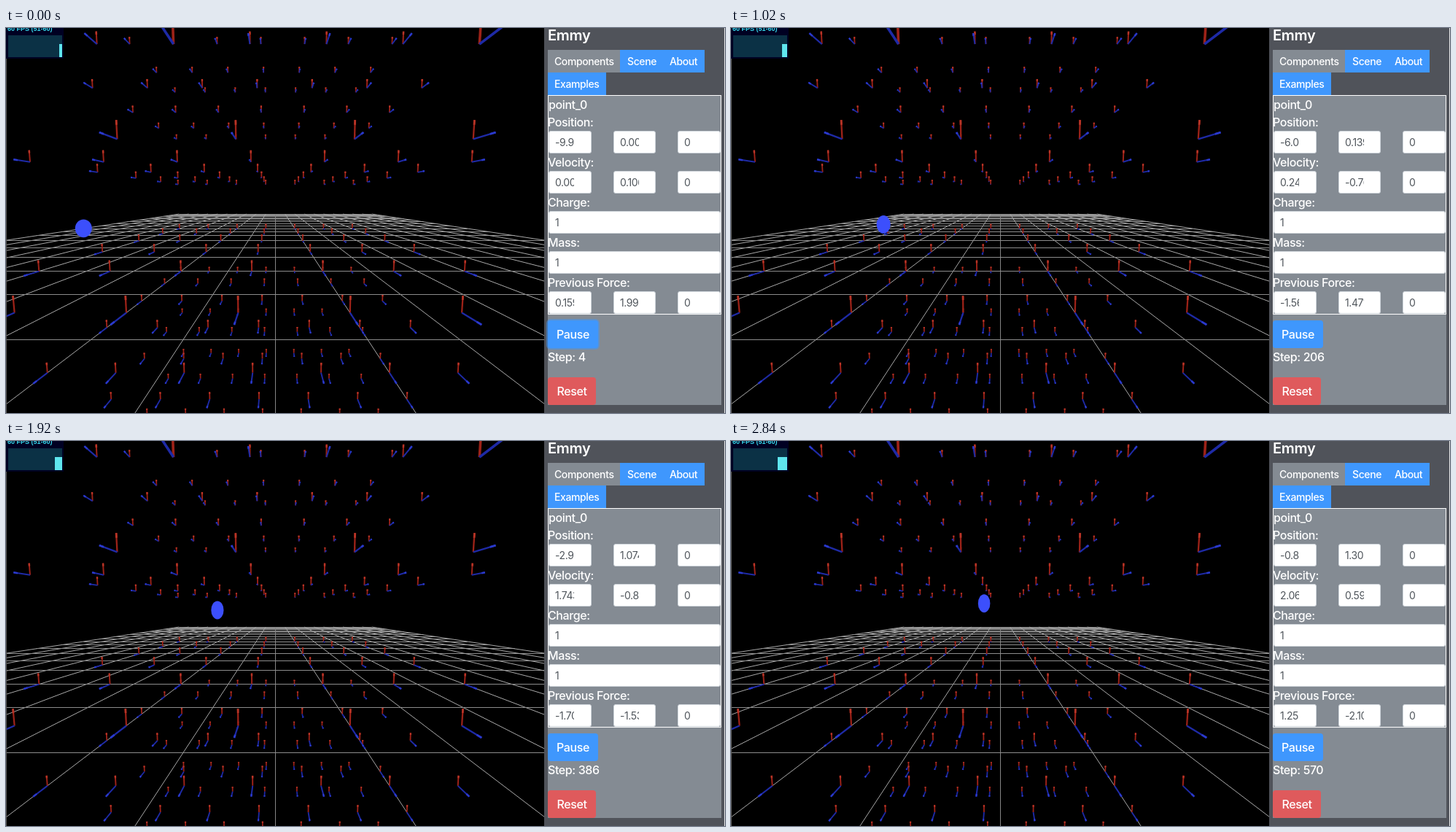
Animation, 986 px wide and 528 px high, one loop 2860 ms. Source, as an HTML page with a canvas:

```html
<!DOCTYPE html>
<html lang="en">
<head>
<meta charset="utf-8">
<title>Field simulation</title>
<style>
html, body { margin: 0; width: 100%; height: 100%; overflow: hidden; background: #000; }
#stage { position: relative; width: 986px; height: 528px; overflow: hidden; background: #50535a;
  font: 500 16px/24px Inter, Roboto, sans-serif; letter-spacing: -.025em; color: #fff; }
#stage > * { position: absolute; box-sizing: border-box; white-space: nowrap; }
canvas { left: 0; top: 0; }
.body { left: 743px; top: 92px; width: 238px; height: 425px; background: #848b93; }
.frame { left: 743px; top: 92px; width: 238px; height: 301px; border: 1px solid #fff; }
.edge { left: 985px; top: 0; width: 1px; height: 528px; background: #e4e5e7; }
.title { left: 743px; top: -2px; font-size: 20px; font-weight: 600; letter-spacing: -.015em; }
.tab { height: 31px; line-height: 31px; font-size: 14px; padding-left: 9px; background: #3f97fd; }
.tab.on { background: #848b93; }
.button { left: 743px; height: 38px; line-height: 38px; text-align: center; border-radius: 4px; }
.field { height: 31px; background: #fff; border: 1px solid #ced4da; border-radius: 3px;
  font-size: 14px; font-weight: 400; line-height: 30px; color: #50565c; padding-left: 8px; }
.field span { display: block; width: 26px; overflow: hidden; }
</style>
</head>
<body>
<div id="stage"></div>
<script>
const LOOP = 2860, TICK = 20;
const stage = document.getElementById('stage');

function add(cls, text, box = {}) {
  const el = document.createElement('div');
  el.className = cls;
  el.textContent = text;
  for (const key in box) el.style[key] = box[key] + 'px';
  stage.append(el);
  return el;
}

// Side panel
add('body', '');
add('frame', '');
add('edge', '');
add('title', 'Emmy');
add('tab on', 'Components', { left: 743, top: 30, width: 99 });
add('tab', 'Scene', { left: 842, top: 30, width: 59, paddingLeft: 10 });
add('tab', 'About', { left: 901, top: 30, width: 57 });
add('tab', 'Examples', { left: 743, top: 61, width: 80 });
add('label', 'point_0', { left: 744, top: 93 });

function field(left, top, width, text) {
  const span = document.createElement('span');
  span.textContent = text;
  add('field', '', { left, top, width }).append(span);
  return span;
}

const values = [];
['Position:', 'Velocity:', 'Charge:', 'Mass:', 'Previous Force:'].forEach((name, i) => {
  const top = 117 + 55 * i;
  add('label', name, { left: 743, top });
  if (i === 2 || i === 3) {
    field(744, top + 24, 236, '1');
  } else {
    values.push(field(744, top + 24, 59, ''), field(833, top + 24, 58, ''));
    field(921, top + 24, 59, '0');
  }
});

const pause = add('button', 'Pause', { top: 401, width: 69 });
pause.style.background = '#3f97fd';
const counter = add('label', '', { left: 743, top: 439 });
add('button', 'Reset', { top: 479, width: 66 }).style.background = '#df5a5c';

// Camera at (0, 1, 10) looking at the origin
const CX = 369.5, CY = 275, FX = 264.5, FY = 400.4, TILT = Math.hypot(1, 10);

function project(x, y, z) {
  const depth = (101 - y - 10 * z) / TILT;
  const up = (10 * y - z) / TILT;
  return { x: CX + FX * x / depth, y: CY - FY * up / depth, depth };
}

function makeCanvas() {
  const c = document.createElement('canvas');
  c.width = 738;
  c.height = 528;
  return c;
}

function line(g, a, b, color, width) {
  g.strokeStyle = color;
  g.lineWidth = width;
  g.beginPath();
  g.moveTo(a.x, a.y);
  g.lineTo(b.x, b.y);
  g.stroke();
}

function arrow(g, a, b, shaft, head) {
  const w = 1.5 + 4 / a.depth;
  line(g, a, b, shaft, w);
  const mid = { x: a.x + (b.x - a.x) * .75, y: a.y + (b.y - a.y) * .75 };
  line(g, mid, b, head, w + .5);
}

function drawGrid(g) {
  for (let i = -10; i <= 10; i++) {
    line(g, project(i, 0, -10), project(i, 0, 9.5), i ? '#a8a8a8' : '#858585', 1);
    if (i > 9) continue;
    const a = project(-10, 0, i), b = project(10, 0, i);
    a.y = b.y = Math.floor(a.y) + .5;
    line(g, a, b, '#8c8c8c', 1);
  }
}

function drawField(g) {
  for (let z = -10; z <= 8; z += 3)
    for (let y = -10; y <= 8; y += 3)
      for (let x = -10; x <= 8; x += 3) {
        const base = project(x, y, z);
        if (base.depth < .8) continue;
        arrow(g, base, project(x, y + .31, z), '#9c2218', '#b83426');
        arrow(g, base, project(x, y, z + .5), '#1e2aa6', '#2a39cc');
      }
}

function drawMeter(g) {
  g.fillStyle = '#000022';
  g.fillRect(0, 0, 79, 42);
  g.fillStyle = '#0b3145';
  g.fillRect(3, 10, 74, 30);
  g.fillStyle = '#35d5e8';
  g.font = 'bold 9px "Liberation Sans", Arial, sans-serif';
  g.fillText('60 FPS (51-60)', 2, 4);
  g.fillStyle = '#555';
  g.fillRect(0, 42, 1, 486);
}

const scene = makeCanvas(), arrows = makeCanvas(), view = makeCanvas();
const back = scene.getContext('2d'), front = view.getContext('2d');
back.fillRect(0, 0, 738, 528);
drawGrid(back);
drawField(arrows.getContext('2d'));
back.filter = 'blur(.5px)';
back.drawImage(arrows, 0, 0);
back.filter = 'none';
drawMeter(back);
stage.append(view);

// Charge in crossed fields, Euler steps
const path = [];
let x = -10, y = 0, vx = 0, vy = 0;
for (let i = 0; i <= 580; i++) {
  const fx = 2 * vy, fy = 2 - 2 * vx;
  vx += fx / 75;
  vy += fy / 75;
  x += vx / 60;
  y += vy / 60;
  path.push([x, y, vx, vy, fx, fy]);
}

function drawBall(g, px, py) {
  const p = project(px, py, 0), r = .31;
  const rx = FX * r / p.depth * Math.hypot(1, px / p.depth);
  g.fillStyle = '#3c4ffc';
  g.beginPath();
  g.ellipse(p.x, p.y, rx, FY * r / p.depth, 0, 0, 7);
  g.filter = 'blur(.5px)';
  g.fill();
  g.filter = 'none';
}

const start = performance.now();

function render() {
  const t = Math.max(0, performance.now() - start) % LOOP;
  const tick = Math.floor(t / TICK);
  const step = Math.max(4, 4 * tick + 2);
  const state = path[step - 1];

  front.drawImage(scene, 0, 0);
  const bar = Math.floor(4 + t / 315);
  front.fillStyle = '#5fe6ee';
  front.fillRect(77 - bar, 22, bar, 18);
  drawBall(front, state[0], state[1]);

  values.forEach((el, i) => { el.textContent = String(state[i]); });
  counter.textContent = 'Step: ' + step;
  pause.style.boxShadow = tick ? 'none' : '0 0 0 2px rgba(63,151,253,.5)';
  requestAnimationFrame(render);
}
render();
</script>
</body>
</html>
```
